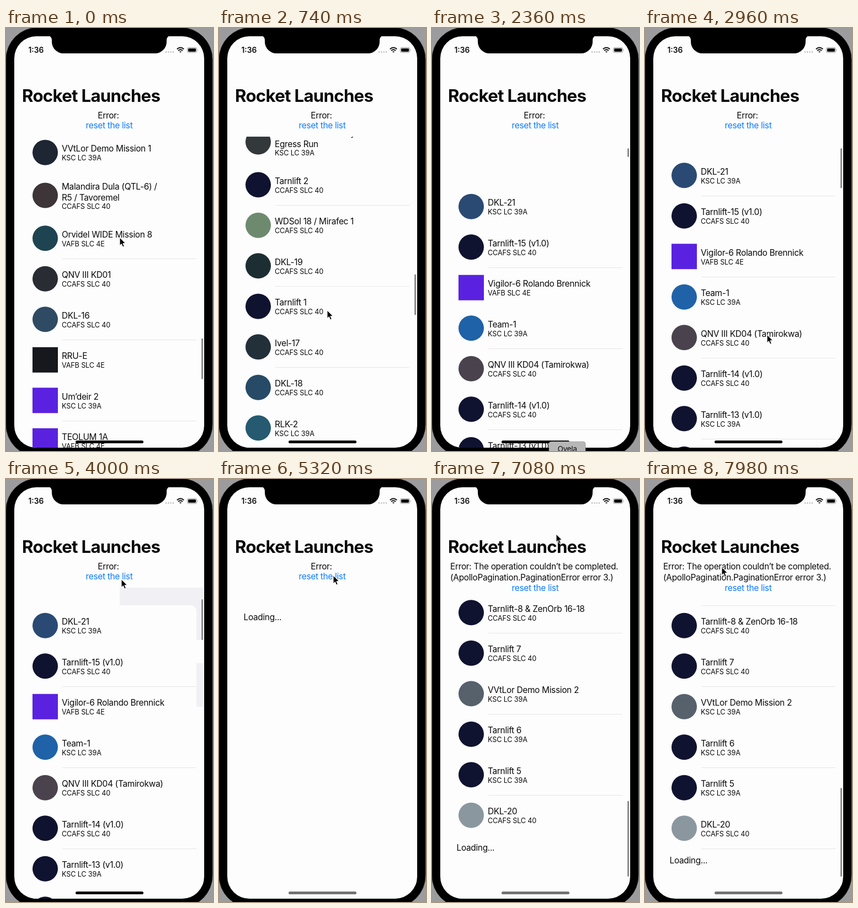
An HTML page for the animation above (8 s loop, 375 by 767 pixels).

```html
<!DOCTYPE html>
<html lang="en">
<head>
<meta charset="utf-8">
<title>Rocket Launches</title>
<style>
html, body { margin: 0; width: 100%; height: 100%; overflow: hidden; background: #9c9c9e; }
svg { display: block; width: 375px; height: 767px; }
text { font: 15.4px Inter, Roboto, sans-serif; letter-spacing: -.3px; fill: #0a0a0a; white-space: pre; }
.site { font-size: 12.6px; letter-spacing: -.12px; }
.head { font-size: 31.2px; font-weight: 700; letter-spacing: -.7px; }
.clock { font-size: 13.8px; font-weight: 600; letter-spacing: 0; }
.tip { font-size: 13.6px; }
.link { fill: #0a7aff; }
.mid { text-anchor: middle; }
.rule { fill: #e6e6e8; shape-rendering: crispEdges; }
</style>
</head>
<body>
<svg viewBox="0 0 375 767">
  <defs>
    <clipPath id="screen"><rect x="15" y="15" width="344" height="746" rx="40"/></clipPath>
    <clipPath id="view"><rect id="viewBox" x="29" y="197" width="328" height="600"/></clipPath>
  </defs>
  <rect x="0" y="-1" width="374" height="778" rx="58" stroke="#262628"/>
  <g clip-path="url(#screen)">
    <rect x="15" y="15" width="344" height="746" fill="#fdfdfd"/>
    <path id="backing" fill="#f0f0f5" d="M206 197H357V292H345V239a10 10 0 0 0-10-10H206zM345 334h12v79h-12z"/>
    <g clip-path="url(#view)"><g id="list"><g id="rows"></g><text id="loading" x="44.5">Loading...</text></g></g>
    <rect id="bar" x="354" width="3" rx="1.5" fill="#8c8c8e"/>
    <rect id="home" x="126" y="748" width="123" height="5" rx="2.5"/>
    <text class="head" x="29" y="134">Rocket Launches</text>
    <text id="brief" class="mid" x="185.5" y="163.5">Error:</text>
    <g id="error">
      <text x="33" y="163.5">Error: The operation couldn’t be completed.</text>
      <text x="33" y="184">(ApolloPagination.PaginationError error 3.)</text>
    </g>
    <text id="link" class="mid link" x="187">reset the list</text>
    <path d="M76 14a7 8 0 0 1 7 8v3a21 21 0 0 0 21 21h166a21 21 0 0 0 21-21v-3a7 8 0 0 1 7-8z"/>
    <text class="clock" x="40.5" y="45">1:36</text>
    <path d="M290 43.5h14" stroke="#b4b4b4" stroke-width="2.4" stroke-linecap="round" stroke-dasharray="0 4.3"/>
    <g fill="none" stroke="#0a0a0a" stroke-width="2">
      <path d="M309.8 38.3q6.2-5.6 12.4 0M312 41q4-3.4 8 0"/>
      <path d="M314.5 42.8h3l-1.5 1.5z" stroke-width="1"/>
    </g>
    <rect x="328.5" y="35.5" width="17" height="9" rx="2.6" fill="none" stroke="#8f8f8f"/>
    <rect x="330" y="37" width="14" height="6" rx="1.4"/>
    <path d="M346.8 38.3q1.6 1.7 0 3.4z" fill="#8f8f8f"/>
  </g>
  <g id="tip">
    <rect x="212" y="750" width="66" height="24" rx="4" fill="#b7b7b7" stroke="#8e8e8e" stroke-width=".6"/>
    <text class="mid tip" x="245" y="767.5">Ovela</text>
  </g>
  <path id="cursor" d="M0 0V14.5L3.3 11.4 5.6 17 8.2 15.9 5.9 10.5H10.4z" stroke="#fff"/>
</svg>
<script>
const $ = id => document.getElementById(id);
const K = 'KSC LC 39A', C = 'CCAFS SLC 40', V = 'VAFB SLC 4E';
const VIOLET = '#5a22e0';
const net = (name, site = C) => ['Tarnlift' + name, site, '#10132f'];

// [title (| breaks the line), site, badge colour, square badge]
const launches = [
  ['DKL-21', K, '#2a4a74'],
  net('-15 (v1.0)'),
  ['Vigilor-6 Rolando Brennick', V, VIOLET, 1],
  ['Team-1', K, '#1f62a8'],
  ['QNV III KD04 (Tamirokwa)', C, '#4a424c'],
  net('-14 (v1.0)'), net('-13 (v1.0)', K), net('-12 (v1.0)', K), net('-11 (v1.0)', K),
  ['TEOLUM 1B, KELPOS-1,|Rozuk-0172', C, '#21486e'],
  net('-10 (v1.0) & ZenOrb|19-21'),
  net('-9 (v1.0) & GreyDune|Zonal 5-6', K),
  ['VOLTIRA-II', C, '#1d2f6e'],
  ['QNV III KD03', C, '#3a4250'],
  net('-8 & ZenOrb 16-18'), net(' 7'),
  ['VVtLor Demo Mission 2', K, '#56616c'],
  net(' 6', K), net(' 5', K),
  ['DKL-20', C, '#8b979f'],
  net(' 4'), net(' 3'),
  ['Pilot Module Midway|Egress Run', K, '#33393a'],
  net(' 2'),
  ['WDSol 18 / Mirafec 1', C, '#6d8a6f'],
  ['DKL-19', C, '#1d2e33'],
  net(' 1'),
  ['Ivel-17', C, '#22303a'],
  ['DKL-18', C, '#274a66'],
  ['RLK-2', K, '#255a70'],
  ['KESTROM Trio', V, '#3d5060'],
  net(' v0.9'),
  ['DKL-17', C, '#2c3d55'],
  ['Zahrun 6A', K, '#45505c'],
  ['VVtLor Demo Mission 1', K, '#1d2632'],
  ['Malandira Dula (QTL-6) /|R5 / Tavoremel', C, '#3d3537'],
  ['Orvidel WIDE Mission 8', V, '#1d4450'],
  ['QNV III KD01', C, '#2a2c34'],
  ['DKL-16', C, '#2f4b63'],
  ['RRU-E', V, '#17181e', 1],
  ['Um’deir 2', K, VIOLET, 1],
  ['TEOLUM 1A', V, VIOLET, 1]
];
const PAGE = 20;

let y = 0, pageEnd = 0;
$('rows').innerHTML = launches.map(([title, site, color, square], i) => {
  const lines = title.replace('&', '&amp;').split('|'), two = lines.length > 1;
  const h = two ? 82 : 73.5;
  const row = `<g transform="translate(0 ${y})">
    <rect x="48" y="${h / 2 - 23}" width="46" height="46" rx="${square ? 0 : 23}" fill="${color}"/>
    ${lines.map((s, n) => `<text x="101" y="${(two ? 30 : 35) + n * 20}">${s}</text>`).join('')}
    <text class="site" x="101" y="${two ? 65.5 : 51}">${site}</text>
    <rect class="rule" x="101.5" y="${h + .25}" width="243.5" height=".5"/></g>`;
  y += h;
  if (i === PAGE - 1) pageEnd = y;
  return row;
}).join('');
const rows = [...$('rows').children];

const STEP = 147.8, PULLED = 16, CLICK = 33, FAIL = 39, FLICK = 41, HIT = 44, FREED = 46;
const TOP = 229, END = -825.5, STRETCH = 57.75;

const clamp = (v, lo = 0, hi = 1) => Math.max(lo, Math.min(hi, v));
const ramp = (k, from, to) => clamp((k - from) / (to - from));
const mix = (a, b, f) => a + (b - a) * f;
const settle = n => Math.exp(-.9 * Math.max(0, n));

// Walks through key points [step, ...values]
const along = (keys, k) => keys.slice(1).reduce((p, key, i) => {
  const f = ramp(k, keys[i][0], key[0]);
  return p.map((v, n) => mix(v, key[n + 1], f));
}, keys[0].slice(1));

const drags = [[0, -2344], [5, -1477], [11, -169.5], [PULLED, 287]];
const pointer = [[0, 206, 380], [5, 196, 512], [11, 246, 387], [PULLED, 228, 770], [27, 209, 182],
  [CLICK, 207, 175], [FAIL, 207, 175], [FLICK, 280, 540], [HIT, 247, 209], [47, 225, 100], [54, 139, 160]];

function scrollAt(k) {
  if (k <= PULLED) return along(drags, k)[0];
  if (k < FAIL) return TOP + STRETCH * settle(k - PULLED);
  if (k <= HIT) return mix(TOP + 20, END - STRETCH, ramp(k, FLICK, HIT) ** 1.3);
  return END - STRETCH * settle(k - FREED);
}

// Scroll thumb: shrinks by the amount the list is pulled past an end
function thumbAt(top, failed) {
  const [start, rate, full] = failed ? [237, .3006, 161] : [218, .134, 74];
  const s = TOP + (failed ? 20 : 0) - top, max = failed ? TOP + 20 - END : Infinity;
  const below = Math.max(0, s - max);
  return { y: start + rate * clamp(s, 0, max) + below, height: full - below - Math.max(0, -s) };
}

const set = (id, attrs) => { for (const a in attrs) $(id).setAttribute(a, attrs[a]); };
const show = (id, on) => { $(id).style.display = on ? '' : 'none'; };

function draw(ms) {
  const k = Math.floor((ms % 8000 + 5) / STEP);
  const failed = k >= FAIL, reset = k >= CLICK;
  const top = Math.round(scrollAt(k) * 2) / 2;

  set('list', { transform: `translate(0 ${top})` });
  set('rows', { opacity: failed ? 1 : 1 - ramp(k, CLICK - 1, 36) });
  rows.forEach((r, i) => { r.style.display = reset && i >= PAGE ? 'none' : ''; });
  set('loading', { y: (failed ? pageEnd : 0) + 27, opacity: ramp(k, CLICK, 36) });

  set('bar', { ...thumbAt(top, failed), opacity: k < FLICK ? 1 - ramp(k, 28, 31) : ramp(k, FLICK, FLICK + 1) });
  set('home', { opacity: 1 - .45 * ramp(k, 27, 32) });
  set('viewBox', { y: failed ? 217 : 197 });
  set('link', { y: failed ? 202.5 : 182 });
  show('brief', !failed);
  show('error', failed);
  show('backing', k >= 25 && k < CLICK);
  show('tip', k === PULLED);
  set('cursor', { transform: `translate(${along(pointer, k)})` });
}

const start = performance.now();
function tick() {
  draw(performance.now() - start);
  requestAnimationFrame(tick);
}
tick();
</script>
</body>
</html>
```
